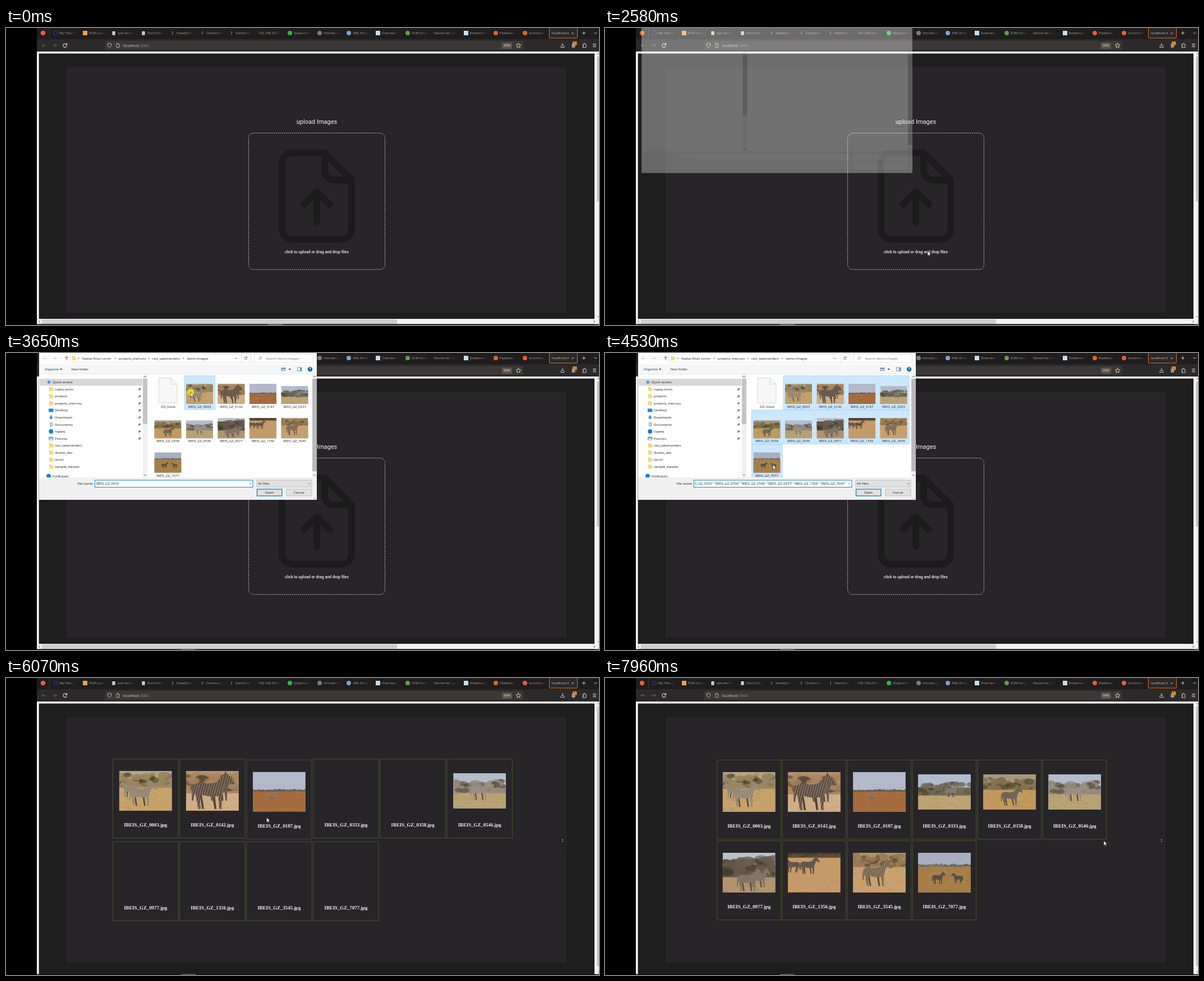
An HTML page for the animation above (8 s loop, 1057 px wide and 530 px high).

```html
<!DOCTYPE html>
<html lang="en">
<head>
<meta charset="utf-8">
<title>Image upload</title>
<style>
  html, body { margin: 0; width: 100%; height: 100%; overflow: hidden; background: #000; }
  svg { display: block; }
  text { font-family: "Open Sans", "Noto Sans", sans-serif; white-space: pre; }
  .din { font-family: Roboto, sans-serif; }
  .serif { font-family: "Liberation Serif", "Noto Serif", serif; font-weight: 700; }
</style>
</head>
<body>
<svg id="stage" width="1057" height="530" viewBox="0 0 1057 530"></svg>
<script>
const LOOP = 8000;
const STRIP = '#1f1d1d', BLUE = '#0078d7';

const rect = (x, y, w, h, fill, more = '') =>
  `<rect x="${x}" y="${y}" width="${w}" height="${h}" fill="${fill}" ${more}/>`;
const line = (d, color, width = 1, more = '') =>
  `<path d="${d}" fill="none" stroke="${color}" stroke-width="${width}" ${more}/>`;
const shape = (d, fill) => `<path d="${d}" fill="${fill}"/>`;
const dot = (x, y, r, fill, more = '') =>
  `<circle cx="${x}" cy="${y}" r="${r}" fill="${fill}" ${more}/>`;
// y is the optical middle of the line
const text = (x, y, s, size, fill, more = '') =>
  `<text x="${x}" y="${y + size * 0.36}" font-size="${size}" fill="${fill}" ${more}>${s}</text>`;
const mid = 'text-anchor="middle"';
const group = (id, body, more = '') => `<g id="${id}" ${more}>${body}</g>`;
const chevron = (x, y, dir, color, r = 2) =>
  line(`M${x - r} ${y - dir * r / 2}l${r} ${dir * r}l${r} ${-dir * r}`, color, 0.9);
const sideChevron = (x, y, dir, color, r = 2) =>
  line(`M${x - dir * r / 2} ${y - r}l${dir * r} ${r}l${-dir * r} ${r}`, color, 0.9);

/* ---------- photos ---------- */
function random(seed) {
  return () => (seed = (seed * 16807) % 2147483647) / 2147483647;
}

// name, height, sky, bush, ground, bush top, ground top, coat, animals [x, y, scale, facing]
const photos = [
  ['0003', 71, '#b5a58a', '#9a8761', '#c4a26a', 2, 30, '#a89a84', [[34, 19, 0.9, -1], [14, 19, 1.4, 1]]],
  ['0142', 71, '#b5946f', '#a98560', '#cfad84', 2, 40, '#6b5848', [[34, 10, 1.4, 1], [5, 3, 2.1, 1]]],
  ['0187', 71, '#b3b9ca', '#66604a', '#a56b3f', 30, 35, '#8b8078', [[28, 36, 0.4, 1]]],
  ['0333', 63, '#b0bbcf', '#716a55', '#bda272', 12, 38, '#8c857c', [[46, 18, 0.75, 1]]],
  ['0358', 63, '#a8977b', '#83734f', '#c2995d', 4, 28, '#6f6658', [[29, 22, 1.1, 1]]],
  ['0546', 63, '#b4bccd', '#978a7c', '#b8a172', 10, 36, '#aaa092', [[28, 14, 1.1, 1]]],
  ['0977', 71, '#bcc2ca', '#685b4c', '#b1936c', 4, 44, '#867a6d', [[44, 28, 1.1, 1], [22, 28, 1.3, 1]]],
  ['1356', 71, '#4b3c2c', '#5e4c38', '#c59a69', 0, 9, '#5f5145', [[24, 9, 0.85, -1], [19, 7, 1, 1]]],
  ['3545', 71, '#b3946a', '#997c54', '#c8a06e', 0, 26, '#8a7459', [[13, 13, 1.5, 1]]],
  ['7077', 71, '#a9aec0', '#76716a', '#a67e48', 19, 25, '#50463d', [[23, 34, 0.7, 1], [82, 36, 0.6, -1]]],
];

function photoSymbol([name, h, sky, bush, ground, top, floor, coat, herd], i) {
  const next = random(i * 97 + 31), deep = floor - top;
  const num = v => v.toFixed(1);
  let s = rect(0, 0, 94, h, sky) + rect(0, top + deep * 0.45, 94, h, bush);
  for (let k = 0; k < 44; k++) {
    const r = deep * (0.08 + next() * 0.14);
    s += `<ellipse cx="${num(next() * 94)}" cy="${num(top + r + next() * (deep - 2 * r))}"
      rx="${num(r * 1.5 + 1)}" ry="${num(r)}" fill="${k % 3 ? bush : '#3c3524'}" opacity="${k % 3 ? 0.8 : 0.45}"/>`;
  }
  s += rect(0, floor, 94, h - floor, ground);
  for (let k = 0; k < 30; k++) {
    const y = floor + next() * (h - floor);
    s += rect(num(next() * 94 - 4), num(y), 8, 1, k % 2 ? '#fff' : '#402a10', 'opacity=".1"');
  }
  for (const [x, y, k, dir] of herd)
    s += `<use href="#zebra" color="${coat}" transform="translate(${x} ${y}) scale(${k * dir} ${k})"/>`;
  return `<symbol id="p${name}" viewBox="0 0 94 ${h}">${s}</symbol>`;
}

const photo = (p, x, y, w) =>
  `<use href="#p${p[0]}" x="${x}" y="${y}" width="${w}" height="${w * p[1] / 94}"/>`;

const body = 'M4 11Q7 8 13 9Q20 10 24 8Q27 4 30 1L31 -1L32.5 1L35 4L38 9Q37 11 35 9.5L32 7.5Q30 11 29 15L28 19L28 31H26L25 20Q18 21 11 19L9.5 23L10 31H8L6.5 23L5.5 17Q4 19 4 24L2.7 24Q2 15 4 11Z';
const farLegs = 'M22 18l1.5 13h-1.7l-2 -12zM11 18l2 13h-1.7l-2 -12z';

const defs = `<defs>
  <pattern id="stripes" width="2" height="4" patternUnits="userSpaceOnUse" patternTransform="rotate(14)">
    ${rect(0, 0, 1, 4, '#2e2620', 'opacity=".4"')}${rect(1, 0, 1, 4, '#e8dccb', 'opacity=".2"')}</pattern>
  <g id="zebra">${shape(farLegs, '#51463a')}${shape(body, 'currentColor')}${shape(body, 'url(#stripes)')}</g>
  <linearGradient id="fade"><stop stop-color="${STRIP}" stop-opacity="0"/><stop offset="1" stop-color="${STRIP}"/></linearGradient>
  <clipPath id="field">${rect(160, 227, 269, 13, '#fff')}</clipPath>
  <clipPath id="side">${rect(59, 38, 184, 184, '#fff')}</clipPath>
  <clipPath id="pane">${rect(252, 38, 293, 184, '#fff')}</clipPath>
  ${photos.map(photoSymbol).join('')}
</defs>`;

/* ---------- browser ---------- */
// text x, title, icon kind, icon colour
const tabs = [
  [95, 'My Tiles D', 'ring', '#24348c'], [148, 'PS/K-Lume', 'box', '#f0a24a'],
  [199, 'vpn.dorvi.c', 'doc', '#eee'], [252, 'Dorvi SSLV', 'doc', '#eee'],
  [304, 'SteadyPat', 'bar', '#666'], [357, 'Orchestrat', 'bar', '#666'],
  [409, 'Stencil UI', 'bar', '#666'], [450, '192.168.204.77', '', ''],
  [513, 'QuipLoom', 'dot', '#2cb742'], [566, 'Introducin', 'dot', '#7b7b7b'],
  [618, 'XML Error', 'dot', '#7da3cf'], [670, 'Overview', 'box', '#c3e0f4'],
  [723, 'ZUM movies', 'dot', '#5f9f4d'], [763, 'Device list | QA', '', ''],
  [827, 'Emberwall', 'box', '#c3e0f4'], [880, 'Pipelines', 'dot', '#e8602c'],
  [932, 'src/compo', 'dot', '#e8602c'],
];
const icons = {
  ring: (x, c) => dot(x, 9, 3.4, 'none', `stroke="${c}" stroke-width="1.4"`),
  box: (x, c) => rect(x - 4, 5, 8, 8, c),
  doc: (x, c) => rect(x - 2.5, 6, 5, 6.5, c) + line(`M${x - 1.2} 8h2.4m-2.4 2h2.4`, '#555', 0.7),
  bar: (x, c) => rect(x - 0.8, 6, 1.6, 6, c),
  dot: (x, c) => dot(x, 9, 4, c),
};

function tab([x, title, kind, color]) {
  const w = kind ? 30 : 40;
  return text(x, 9, title, 6, '#a9a7a5') +
    rect(x + w - 13, 3, 13, 13, 'url(#fade)') + rect(x + w, 3, 14, 13, STRIP) +
    (kind ? icons[kind](x - 7, color) : '');
}

const round = 'stroke-linecap="round" stroke-linejoin="round"';
const browser =
  rect(55, 0, 1002, 20, STRIP) + rect(55, 20, 1002, 22, '#2b2929') +
  dot(66, 9, 4.2, '#e8613a') + rect(77, 0, 1, 18, '#3d3a3a') +
  tabs.map(tab).join('') +
  rect(968.5, -2, 50, 20, '#2b2827', 'stroke="#d9722c" rx="1"') +
  text(973, 9, 'localhost:3', 6, '#c9c7c5') + text(1010, 9, '×', 8, '#ddd', mid) +
  line('M1027 9h6m-3 -3v6', '#ddd', 0.9) + chevron(1051, 9, 1, '#ddd', 2.6) +
  line('M71 31h-7m3 -3l-3 3l3 3', '#6a6868') + line('M83 31h7m-3 -3l3 3l-3 3', '#6a6868') +
  line('M108 29.5a3.3 3.3 0 1 0 .3 2.4M108.6 27v3h-3', '#ddd', 1.1) +
  rect(177, 23, 745, 16, '#3b3736', 'rx="2"') +
  line('M181 28.5l3.5 -1.3l3.5 1.3q0 4.5 -3.5 6.5q-3.5 -2 -3.5 -6.5z', '#c8c6c4', 0.9) +
  line('M197 27.5h3l2 2v5h-5zm3 0v2h2', '#c8c6c4', 0.8) +
  text(208.5, 31.2, 'localhost<tspan fill="#8d8a88">:3000</tspan>', 6.85, '#cfccca') +
  rect(884, 26, 18, 11, '#5f554b', 'rx="2"') + text(893, 31.3, '90%', 5.6, '#eee', mid) +
  line('M913.5 27l1.2 2.7l3 .3l-2.2 2l.6 3l-2.6 -1.5l-2.6 1.5l.6 -3l-2.2 -2l3 -.3z', '#ddd', 0.9, round) +
  line('M992 27v5m-2.2 -2.2l2.2 2.2l2.2 -2.2M989 32v2.5h6v-2.5', '#ddd', 0.9) +
  rect(1008.5, 28, 6, 7, '#8f9aa8', 'rx="1"') + rect(1010, 24, 7.5, 6.5, '#f08a24', 'rx="1"') +
  text(1013.7, 27.3, '1', 5, '#222', mid) +
  line('M1028 29h2q0 -2 1 -2t1 2h2v6h-6v-2q2 0 2 -1t-2 -1z', '#ddd', 0.9) +
  line('M1046 28.5h6m-6 2.5h6m-6 2.5h6', '#ddd', 0.9);

/* ---------- page ---------- */
const page =
  rect(55, 42, 1002, 487, '#fff') + rect(58.6, 45.5, 990.4, 483.5, '#1e1e1e') +
  rect(108, 70, 891, 438, '#272527') + rect(1053, 42, 4, 487, '#f0f0f0') +
  chevron(1055.5, 46, -1, '#555', 1.4);

const fileIcon = line('M568 223H510a18 18 0 0 0 -18 18V359a18 18 0 0 0 18 18H598a18 18 0 0 0 18 -18V271L568 223V255a16 16 0 0 0 16 16H616M554 346V293M531 315L554 292L577 315', '#1b1b1b', 12, round);

const upload =
  text(554, 167.3, 'upload Images', 11, '#f4f4f4', mid + ' class="din"') +
  rect(432.5, 187.5, 243, 243.5, 'none', 'rx="9" stroke="#d8d8d8" stroke-dasharray="1.8 1.8"') +
  fileIcon +
  text(554, 399.5, 'click to upload or drag and drop files', 7, '#f4f4f4', mid + ' class="din" font-weight="500"') +
  rect(55, 519, 1002, 9.5, '#f1f1f1') + rect(64, 520, 633, 8, '#cdcdcd') +
  sideChevron(59.5, 524, -1, '#444') + sideChevron(1048.5, 524, 1, '#444') +
  rect(1053, 51, 4, 259, '#c8c8c8') + chevron(1055.5, 515, 1, '#555', 1.4);

const cardsPage =
  rect(1053, 51, 4, 463, '#c8c8c8') + chevron(1055.5, 524, 1, '#555', 1.4) +
  rect(988.5, 270, 7.5, 40, '#242325', 'rx="2"') +
  dot(992, 288.5, 0.8, '#eee') + dot(992, 291.5, 0.8, '#eee') +
  photos.map((p, i) => group('card' + i,
    `<rect id="edge${i}" fill="none"/>` +
    group('shot' + i, photo(p, -47, 56.7 - p[1] / 2, 94)) +
    text(0, 117.5, `IBEIS_GZ_${p[0]}.jpg`, 8.8, '#f4f4f4', mid + ' class="serif"'))).join('');

const tooltip = rect(574, 409, 52, 12, '#2b2a2c', 'stroke="#4a494c" stroke-width=".6" rx="1"') +
  text(576, 415, 'No files selected.', 6, '#f0f0f0');

/* ---------- file dialog ---------- */
const INK = '#1c1c1c';
const folder = (x, y) => rect(x, y - 3.5, 3.5, 2, '#e3b341') + rect(x, y - 2.8, 7, 6.3, '#f8d775');
const pin = y => shape(`M238.5 ${y - 2.5}l2.5 2.5l-1.8 .6l-1 1.8l-2.6 -2.6l1.7 -.8z`, '#777') +
  line(`M237.4 ${y + 0.8}l-2 2`, '#777', 0.7);

const places = [
  ['nadav.lorim', 'folder', 1], ['projects', 'folder', 1], ['projects_mercury', 'folder', 1],
  ['Desktop', 'desktop', 1], ['Downloads', 'down', 1], ['Documents', 'page', 1],
  ['logseq', 'round', 1], ['Pictures', 'image', 1], ['ravi_salamanders', 'folder', 0],
  ['illumio_dev', 'folder', 0], ['jacuzi', 'folder', 0], ['sample_dataset', 'folder', 0],
];
const placeIcons = {
  folder: y => folder(77, y),
  desktop: y => rect(76, y - 3, 8.5, 6, '#1d8ae0'),
  down: y => shape(`M79 ${y - 3.5}h2.5v3h2.5l-3.7 4l-3.7 -4h2.4z`, '#2a86d1'),
  page: y => rect(78, y - 3.5, 5.5, 7, '#9fb8cf') + line(`M79 ${y - 1}h3.5m-3.5 2h3.5`, '#fff', 0.7),
  round: y => dot(80.3, y, 3.9, '#0082c9'),
  image: y => rect(76, y - 3, 8.5, 6, '#7f9db5') + rect(77, y, 6.5, 2, '#e8eef2'),
};

function sidebar() {
  let s = rect(60, 46, 183, 12.5, '#d9d9d9') +
    shape('M76.5 48l1.1 2.5l2.7 .3l-2 1.9l.5 2.6l-2.3 -1.3l-2.3 1.3l.5 -2.6l-2 -1.9l2.7 -.3z', '#3a8ee0') +
    text(83, 52, 'Quick access', 6, INK);
  places.forEach(([name, icon, pinned], i) => {
    const y = 64.6 + i * 12.57;
    s += placeIcons[icon](y) + text(87, y, name, 6, INK) + (pinned ? pin(y) : '');
  });
  return s + dot(76, 219.6, 3.9, '#0082c9') + text(83, 219.6, 'Foldhaven', 6, INK);
}

const crumbs = [[136, 'Nadav Eitan Lorim'], [201, 'projects_mercury'], [261, 'ravi_salamanders'], [322.5, 'demo-images']];
const colX = i => 288.5 + (i % 5) * 56.5;
const rowY = i => 91 + Math.floor(i / 5) * 61.3;

function files() {
  let s = shape('M272 44h22l11 11v34h-33z', '#f7f7f7') +
    line('M272 44.5h22l11 11v33.5h-33zM294 44.5v11h11', '#cfcfcf', 0.8) +
    text(288.5, 96, '.DS_Store', 6, INK, mid);
  photos.forEach((p, k) => {
    const x = colX(k + 1), y = rowY(k + 1), h = 48 * p[1] / 94;
    s += `<rect id="sel${k}" x="${x - 27}" y="${y - 50.5}" width="54.5" height="60.5"/>` +
      photo(p, x - 24, y - h, 48) + text(x, y + 5, 'IBEIS_GZ_' + p[0], 6, INK, mid);
  });
  return s;
}

const quoted = ['7077', ...photos.slice(0, 9).map(p => p[0])].map(n => `"IBEIS_GZ_${n}"`).join(' ');
const scrolls = thumb =>
  rect(244, 38, 8, 184, '#f0f0f0') + rect(244, 46, 8, thumb, '#c4c4c4') +
  rect(546, 38, 8, 184, '#f0f0f0') + rect(546, 46, 8, 165, '#b9b9b9') +
  [247.7, 549.7].map(x => chevron(x, 42, -1, '#444') + chevron(x, 218, 1, '#444')).join('');

const base = rect(59, -20, 495, 282, '#fff') + rect(59, 222, 495, 40, '#f0f0f0');
const skeleton = scrolls(112) +
  [[127, 228.5, 29, 7], [158, 227, 282, 12.5], [446, 227, 99, 12], [446, 242.5, 46, 13.5], [499, 242.5, 46, 13.5]]
    .map(b => rect(...b, '#fff')).join('');

const content =
  line('M73 9.5h-7m3 -3l-3 3l3 3M83 9.5h7m-3 -3l3 3l-3 3', '#c9c9c9') + chevron(97, 9.5, 1, '#ccc', 1.5) +
  line('M108 13v-7m-3 3l3 -3l3 3', '#555', 1) +
  rect(115, 2, 321.5, 15, '#fff', 'stroke="#d9d9d9" stroke-width=".8"') + folder(117.5, 9.5) +
  crumbs.map(([x, s]) => sideChevron(x - 6.5, 9.5, 1, '#444', 1.5) + text(x, 9.5, s, 6, INK)).join('') +
  chevron(410, 9.5, 1, '#555') + rect(419, 2, 0.8, 15, '#d9d9d9') +
  line('M429.3 8a2.4 2.4 0 1 0 .3 2M429.7 6.5v2h-2', '#444', 0.8) +
  rect(442.5, 2, 105, 15, '#fff', 'stroke="#d9d9d9" stroke-width=".8"') +
  dot(453.7, 8.7, 2, 'none', 'stroke="#888" stroke-width=".8"') + line('M452.3 10.3l-2.2 2.3', '#888', 0.8) +
  text(463.5, 9.5, 'Search demo-images', 6, '#6d6d6d') +
  rect(59, 20, 495, 17, '#f5f6f7') + rect(59, 37, 495, 0.8, '#e3e3e3') +
  text(69, 29, 'Organize', 6, '#1e2f45') + shape('M96 28h4.5l-2.25 2.5z', '#333') +
  text(116.5, 29, 'New folder', 6, '#1e2f45') +
  rect(490.5, 26, 8, 6, '#7d96ad') + rect(491.5, 29, 6, 2, '#dfe8ee') + shape('M503.5 28h4.5l-2.25 2.5z', '#333') +
  rect(519.5, 26, 7.5, 6, '#fff', 'stroke="#4a7da8" stroke-width=".8"') + rect(524, 26, 3, 6, '#5b9bd5') +
  dot(542, 29, 4.2, '#0b66b5') + text(542, 29, '?', 6.5, '#fff', mid + ' font-weight="700"') +
  `<g clip-path="url(#side)">${sidebar()}</g><g clip-path="url(#pane)">${files()}</g>` + scrolls(81) +
  text(156, 233, 'File name:', 6, INK, 'text-anchor="end"') +
  rect(158.5, 227, 281.5, 12.5, '#fff', `stroke="${BLUE}" stroke-width=".9"`) +
  group('mark', rect(160, 228.3, 269, 10, BLUE)) +
  `<g clip-path="url(#field)">${text(160.5, 233.2, 'IBEIS_GZ_0003', 6, INK, 'id="one"')}` +
  text(428.5, 233.2, quoted, 6, INK, 'id="many" text-anchor="end"') + '</g>' +
  chevron(435.5, 233, 1, '#555', 1.8) +
  rect(446.9, 227, 98, 12, '#e1e1e1', 'stroke="#b5b5b5" stroke-width=".8"') +
  text(449, 233.2, 'All Files', 6, INK) + chevron(540.5, 233, 1, '#555', 1.8) +
  rect(447.5, 243, 44.5, 12, '#e1e1e1', `id="open" stroke="${BLUE}" stroke-width="1.2"`) +
  text(469.5, 249, 'Open', 6, INK, mid) +
  rect(499.9, 243, 45, 12, '#e1e1e1', 'stroke="#b5b5b5" stroke-width=".8"') +
  text(522, 249, 'Cancel', 6, INK, mid) +
  line('M552.5 257l-4 4m4 -2l-2 2', '#aaa', 0.7);

const stage = document.getElementById('stage');
stage.innerHTML = defs + rect(0, 0, 1057, 530, '#000') + browser + page +
  group('upload', upload) + group('cards', cardsPage) +
  rect(55, 528.5, 1002, 1.5, '#111') + rect(0, 528.5, 26, 1.5, '#6a6a6a', 'id="task"') +
  group('tip', tooltip) +
  group('dialog', base + group('skeleton', skeleton) + group('content', content)) +
  dot(0, 0, 6.5, '#f2dc1c', 'id="press" opacity=".9"') +
  group('cursor', shape('M0 0V8.3L1.9 6.5L3.2 9.5L4.6 9L3.3 6H5.9Z', '#fff'), 'stroke="#111" stroke-width=".5"');

/* ---------- motion ---------- */
const path = [
  [370, 1019, 526], [1160, 574, 395], [1360, 574, 395], [1430, 575, 398], [2880, 575, 398],
  [3370, 329, 70], [3720, 329, 70], [4190, 290, 197], [4400, 290, 197], [4900, 468, 246.5],
  [5770, 468, 246.5], [6000, 464.5, 249], [6670, 464.5, 249], [7010, 424, 226],
  [7150, 374, 214], [7345, 374, 214], [7900, 889, 290.5],
];
// start, opacity, scale
const fades = [
  [0, 0, 1], [2580, 0.35, 0.975], [2640, 0.65, 0.985], [2700, 0.85, 0.992], [2770, 0.97, 0.997],
  [2840, 1, 1], [5150, 0.9, 0.995], [5210, 0.73, 0.988], [5280, 0.35, 0.97], [5340, 0, 1],
];
const loaded = [5770, 5870, 5970, 6400, 6270, 6060, 6540, 6670, 6800, 6940];
const presses = [[3510, 3720], [4230, 4340], [4930, 5010]];

const el = id => document.getElementById(id);
const set = (id, attrs) => { for (const k in attrs) el(id).setAttribute(k, attrs[k]); };
const show = (id, on) => set(id, { visibility: on ? 'inherit' : 'hidden' });
const within = (t, a, b) => t >= a && t < b;

function pointer(t) {
  t = Math.floor(t / 66.7) * 66.7;
  const i = path.findIndex(k => k[0] > t);
  if (i < 0) return path[path.length - 1].slice(1);
  if (i === 0) return path[0].slice(1);
  const [t0, x0, y0] = path[i - 1], [t1, x1, y1] = path[i];
  const p = (t - t0) / (t1 - t0), e = p * p * (3 - 2 * p);
  return [x0 + (x1 - x0) * e, y0 + (y1 - y0) * e];
}

// A hovered card has a thicker edge, which widens the whole grid
function layCards(t, [x, y]) {
  const over = y < 288 ? Math.max(0, Math.min(5, Math.floor((x - 189.5) / 119.2))) : -1;
  const [left, top, dx, dy, w] = over >= 0
    ? [190.5, 144.5, 119.1, 147.5, 116.4]
    : [200, 146.5, 116.1, 144, 113.4];
  photos.forEach((p, i) => {
    const hot = i === over;
    const cx = left + (i % 6) * dx + w / 2, cy = top + Math.floor(i / 6) * dy + (hot ? 1.7 : 0);
    set('card' + i, { transform: `translate(${cx.toFixed(2)} ${cy.toFixed(2)})` });
    set('edge' + i, {
      x: -w / 2 + (hot ? 1 : 0), y: 0, width: w - (hot ? 2 : 0), height: 141.2,
      stroke: hot ? '#333234' : '#4a5a2f', 'stroke-width': hot ? 2.4 : 0.9,
    });
    show('shot' + i, t >= loaded[i]);
  });
}

function render(t) {
  const at = pointer(t);
  const place = `translate(${at[0].toFixed(2)} ${at[1].toFixed(2)})`;
  set('cursor', { transform: place });
  set('press', { transform: place });
  show('cursor', t >= 370);
  show('press', presses.some(([a, b]) => within(t, a, b)));
  show('tip', within(t, 1960, 2160));
  set('task', { x: t < 2200 ? 467 : 312 });

  const done = t >= 5410;
  show('upload', !done);
  show('cards', done);
  if (done) layCards(t, at);
  else photos.forEach((p, i) => show('shot' + i, false));

  const [, alpha, k] = fades.filter(f => f[0] <= t).pop();
  set('dialog', { opacity: alpha, transform: `translate(306.5 123) scale(${k}) translate(-306.5 -123)` });
  show('dialog', alpha > 0);
  show('skeleton', t < 2900);
  show('content', t >= 2900);

  const all = t >= 4260, sent = t >= 4930;
  photos.forEach((p, i) => {
    const on = all || (i === 0 && t >= 3440);
    const hover = i === 0 && within(t, 3300, 3440);
    set('sel' + i, {
      fill: on ? (sent ? '#d9d9d9' : '#cce8ff') : hover ? '#e5f3ff' : 'none',
      stroke: on && !sent ? '#99d1ff' : 'none', 'stroke-width': 0.8,
    });
  });
  show('one', within(t, 3440, 4260));
  show('many', all);
  show('mark', sent);
  set('many', { fill: sent ? '#fff' : INK });
  set('open', { fill: t >= 4860 ? '#bcdcf4' : '#e1e1e1' });
}

const start = performance.now();
function tick() {
  render((performance.now() - start) % LOOP);
  requestAnimationFrame(tick);
}
tick();
</script>
</body>
</html>
```
